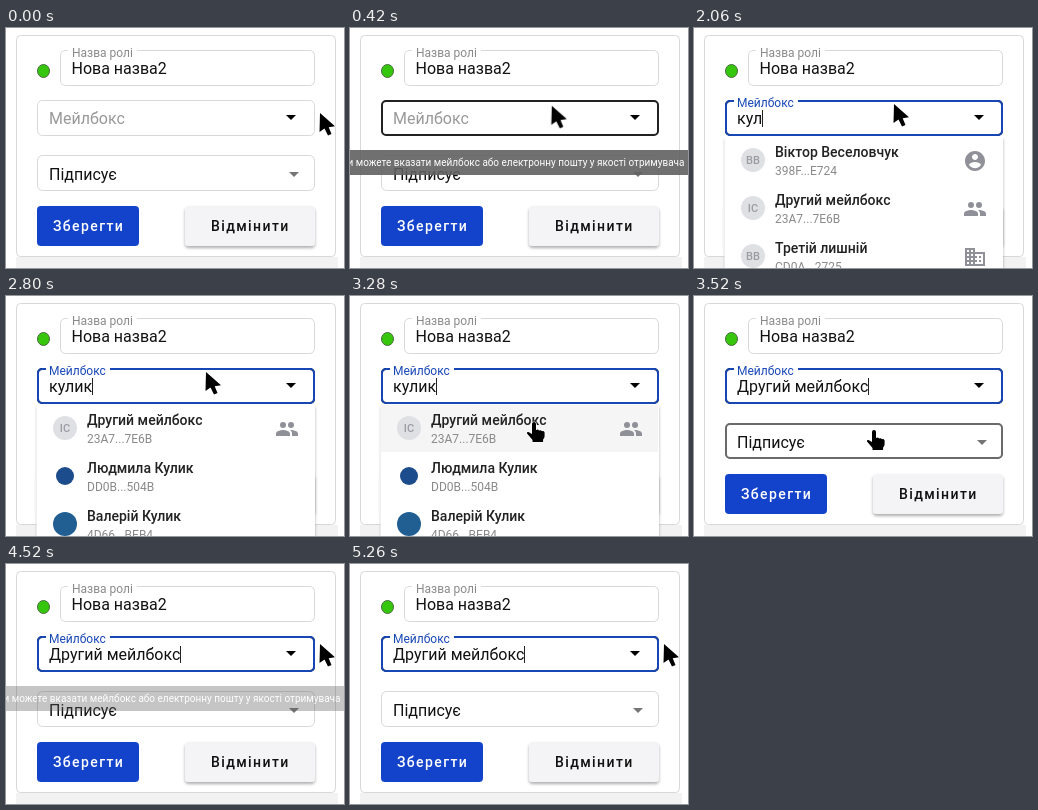
Recreate the animation shown at these times as an HTML page. Size 338x240 px, loop 5420 ms.

```html
<!DOCTYPE html>
<html lang="uk">
<head>
<meta charset="utf-8">
<title>Роль</title>
<style>
html, body { margin: 0; width: 100%; height: 100%; overflow: hidden; background: #fff; }
svg { display: block; width: 100%; height: 100%; font-family: Roboto, sans-serif; }
text { white-space: pre; }
.input { font-size: 16px; fill: #111; }
.small { font-size: 12px; fill: #8a8a8a; }
.name { font-size: 14px; font-weight: 500; fill: #222; }
.initials { font-size: 11px; font-weight: 500; fill: #9a9ba3; text-anchor: middle; }
.button { font-size: 14px; font-weight: 500; letter-spacing: 1.4px; }
.box { fill: #fff; stroke: #d8d8d8; }
.ring { fill: none; stroke-width: 2; }
.icon { fill: #8f9098; }
.hint { font-size: 10px; fill: #fff; text-anchor: end; }
.pointer { stroke: #fff; stroke-width: 1.2; stroke-linejoin: round; paint-order: stroke; }

.anim { animation: 5420ms linear infinite; }
#cursor { animation-name: cursor; }
#arrow { animation-name: arrow; }
#hand { animation-name: hand; }
#hover { animation-name: hover; }
#focus { animation-name: focus; }
#label { animation-name: label; }
#gap { animation-name: gap; }
#tip { animation-name: tip; }
#menu { animation-name: menu; }
#all { animation-name: all; }
#found { animation-name: found; }
#row { animation-name: row; }
#roleHover { animation-name: roleHover; }

@keyframes cursor {
  0%, .4% { transform: translate(314px, 85px); animation-timing-function: ease-in-out; }
  7.5% { transform: translate(202px, 78px); }
  10.3%, 51.7% { transform: translate(200px, 76px); animation-timing-function: ease-in-out; }
  60%, 62.4% { transform: translate(184px, 126px); }
  64.6%, 68.3% { transform: translate(180px, 134px); animation-timing-function: ease-in-out; }
  79.7% { transform: translate(260px, 131px); }
  82.3%, 100% { transform: translate(314px, 80px); }
}
@keyframes arrow {
  0%, 56.8% { opacity: 1; }
  56.81%, 80.1% { opacity: 0; }
  80.11%, 100% { opacity: 1; }
}
@keyframes hand {
  0%, 56.8% { opacity: 0; }
  56.81%, 80.1% { opacity: 1; }
  80.11%, 100% { opacity: 0; }
}
@keyframes hover {
  0%, 1.2% { opacity: 0; }
  3%, 100% { opacity: 1; }
}
@keyframes focus {
  0%, 12.5% { opacity: 0; }
  13.5%, 100% { opacity: 1; }
}
@keyframes label {
  0%, 12.5% { transform: translate(43px, 96px) scale(1); fill: #999; }
  14.5%, 100% { transform: translate(43px, 79px) scale(.75); fill: #1746b5; }
}
@keyframes gap {
  0%, 13% { opacity: 0; }
  14%, 100% { opacity: 1; }
}
@keyframes tip {
  0%, 4.4% { opacity: 0; }
  6.3%, 12.5% { opacity: 1; }
  14%, 82.8% { opacity: 0; }
  84%, 84.8% { opacity: .8; }
  86.4%, 100% { opacity: 0; }
}
@keyframes menu {
  0%, 13.3% { opacity: 0; transform: scaleY(.8); }
  15.3%, 62.7% { opacity: 1; transform: none; }
  64.2%, 100% { opacity: 0; transform: none; }
}
@keyframes all {
  0%, 39.6% { opacity: 1; }
  39.61%, 100% { opacity: 0; }
}
@keyframes found {
  0%, 39.6% { opacity: 0; }
  39.61%, 100% { opacity: 1; }
}
@keyframes row {
  0%, 56.8% { opacity: 0; }
  57.2%, 100% { opacity: 1; }
}
@keyframes roleHover {
  0%, 63.6% { opacity: 0; }
  64.6%, 78.6% { opacity: 1; }
  79.7% { opacity: .6; }
  80.6%, 100% { opacity: 0; }
}
</style>
</head>
<body>
<svg viewBox="0 0 338 240">
  <defs>
    <filter id="shadow" x="-20%" y="-20%" width="140%" height="150%">
      <feDropShadow dx="0" dy="2" stdDeviation="1.6" flood-opacity=".32"/>
    </filter>
    <path id="person" d="M12 2C6.48 2 2 6.48 2 12s4.48 10 10 10 10-4.48 10-10S17.52 2 12 2zm0 3c1.66 0 3 1.34 3 3s-1.34 3-3 3-3-1.34-3-3 1.34-3 3-3zm0 14.2c-2.5 0-4.71-1.28-6-3.22.03-1.99 4-3.08 6-3.08 1.99 0 5.97 1.09 6 3.08-1.29 1.94-3.5 3.22-6 3.22z"/>
    <g id="people">
      <circle cx="8" cy="8" r="3"/><circle cx="16" cy="8" r="3"/>
      <path d="M8 13c-2.33 0-7 1.17-7 3.5V19h14v-2.5c0-2.33-4.67-3.5-7-3.5zM16 13l-1 .05c1.2.85 2 2 2 3.45V19h6v-2.5c0-2.33-4.67-3.5-7-3.5z"/>
    </g>
    <path id="office" fill-rule="evenodd" d="M12 7V3H2v18h20V7zM4 5h2v2H4zm0 4h2v2H4zm0 4h2v2H4zm0 4h2v2H4zM8 5h2v2H8zm0 4h2v2H8zm0 4h2v2H8zm0 4h2v2H8zm4-8h8v10h-8v-2h2v-2h-2v-2h2v-2h-2zm4 2h2v2h-2zm0 4h2v2h-2z"/>
  </defs>

  <rect x="10" y="229" width="322" height="11" fill="#f2f2f3"/>
  <rect class="box" x="10.5" y="7.5" width="319" height="221" rx="4"/>

  <ellipse cx="37.5" cy="43" rx="6" ry="6.5" fill="#36c60c" stroke="#4b6b40"/>
  <rect class="box" x="54.5" y="22.5" width="254" height="35" rx="5"/>
  <rect x="62" y="20" width="69" height="5" fill="#fff"/>
  <text class="small" x="66" y="29">Назва ролі</text>
  <text class="input" x="65.5" y="46">Нова назва2</text>

  <rect class="box" x="31.5" y="127.5" width="277" height="35" rx="5"/>
  <rect id="roleHover" class="ring anim" x="32" y="128" width="276" height="34" rx="4" stroke="#6a6a6a"/>
  <text class="input" x="43" y="152">Підписує</text>
  <path d="M283 144h10l-5 5z" fill="#757575"/>

  <g filter="url(#shadow)">
    <rect x="31" y="178" width="102" height="40" rx="4" fill="#1443cb"/>
    <rect x="179" y="178" width="130" height="40" rx="4" fill="#f4f4f6"/>
  </g>
  <rect x="29" y="178" width="106" height="46" fill="#fff"/>
  <rect x="31" y="178" width="102" height="40" rx="4" fill="#1443cb"/>
  <text class="button" x="47" y="203" fill="#fff">Зберегти</text>
  <text class="button" x="205" y="203" fill="#111">Відмінити</text>

  <rect class="box" x="31.5" y="72.5" width="277" height="35" rx="5"/>
  <rect id="hover" class="ring anim" x="32" y="73" width="276" height="34" rx="4" stroke="#222"/>
  <rect id="focus" class="ring anim" x="32" y="73" width="276" height="34" rx="4" stroke="#1746b5"/>
  <rect id="gap" class="anim" x="40" y="71" width="64" height="4" fill="#fff"/>
  <text id="label" class="anim" font-size="16">Мейлбокс</text>
  <text id="value" class="input" x="43" y="96"></text>
  <path id="caret" d="M.5 82v17" stroke="#222"/>
  <path d="M280 87h10l-5 5z"/>

  <g id="menu" class="anim" style="transform-origin: 170px 108px">
    <rect x="31" y="109" width="278" height="150" fill="#fff" filter="url(#shadow)"/>
    <rect x="30.5" y="108.5" width="278" height="140" fill="#fff"/>
    <rect id="row" class="anim" x="31" y="109" width="277" height="47" fill="#f5f5f5"/>
    <g id="all" class="anim"></g>
    <g id="found" class="anim"></g>
  </g>

  <g id="tip" class="anim">
    <rect y="122" width="338" height="25" fill="#616161" fill-opacity=".9"/>
    <text class="hint" x="334.5" y="138">Ви можете вказати мейлбокс або електронну пошту у якості отримувача</text>
  </g>

  <g id="cursor" class="anim">
    <path id="arrow" class="pointer anim" d="M0 0L-.5 19 4.5 15.5 8 22.5 11.5 21 8.7 14.3 15 13.3z"/>
    <path id="hand" class="pointer anim" d="M-2 2q0-2 2-2t2 2v6q2-1 3 .5 2-.8 3 .7 2-.4 2.6 1.3V14q0 2-1.5 3.5V20H-1.5v-2Q-4 15-7 11.5-7.5 9.5-5.5 10L-2 12z"/>
  </g>
</svg>
<script>
const LOOP = 5420, BLINK = 268;
const FOCUS = 680, PICK = 3400;
const word = 'кулик';
const keys = [1750, 1900, 2060, 2300, 2620];
const $ = id => document.getElementById(id);

// Each entry: name, code, initials or avatar colour, radius, icon
const second = ['Другий мейлбокс', '23A7...7E6B', 'ІС', 12, 'people'];
const all = [
  ['Віктор Веселовчук', '398F...E724', 'ВВ', 12, 'person'],
  second,
  ['Третій лишній', 'CD0A...2725', 'ВВ', 12, 'office']
];
const found = [
  second,
  ['Людмила Кулик', 'DD0B...504B', '#1c4c8c', 9],
  ['Валерій Кулик', '4D66...BEB4', '#215f92', 12]
];

function option([name, code, face, r, icon], i) {
  const plain = face[0] === '#';
  return `<g transform="translate(0 ${i * 48})">
    <circle cx="59" cy="132" r="${r}" fill="${plain ? face : '#dfe0e4'}"/>
    ${plain ? '' : `<text class="initials" x="59" y="136">${face}</text>`}
    <text class="name" x="81" y="129">${name}</text>
    <text class="small" x="81" y="147">${code}</text>
    ${icon ? `<use class="icon" href="#${icon}" x="269" y="121"/>` : ''}
  </g>`;
}
$('all').innerHTML = all.map(option).join('');
$('found').innerHTML = found.map(option).join('');

function content(t) {
  if (t >= PICK) return second[0];
  const typed = word.slice(0, keys.filter(k => k <= t).length);
  return typed || (t > 780 ? 'Мейлбокс' : '');
}

function draw(t) {
  const value = $('value'), text = content(t);
  const empty = t < keys[0];
  if (value.textContent !== text) value.textContent = text;
  value.style.fill = empty ? '#c2c2c2' : '';

  const reset = [FOCUS, ...keys, PICK].filter(k => k <= t).pop();
  const on = reset !== undefined &&
    Math.floor((Math.min(t, 5200) - reset) / BLINK) % 2 === 0;
  const x = 43 + (empty ? 0 : Math.round(value.getComputedTextLength()));
  $('caret').setAttribute('transform', `translate(${x} 0)`);
  $('caret').style.opacity = on ? 1 : 0;
}

let start;
function tick(now) {
  start ??= now;
  draw((now - start) % LOOP);
  requestAnimationFrame(tick);
}
draw(0);
requestAnimationFrame(tick);
</script>
</body>
</html>
```
